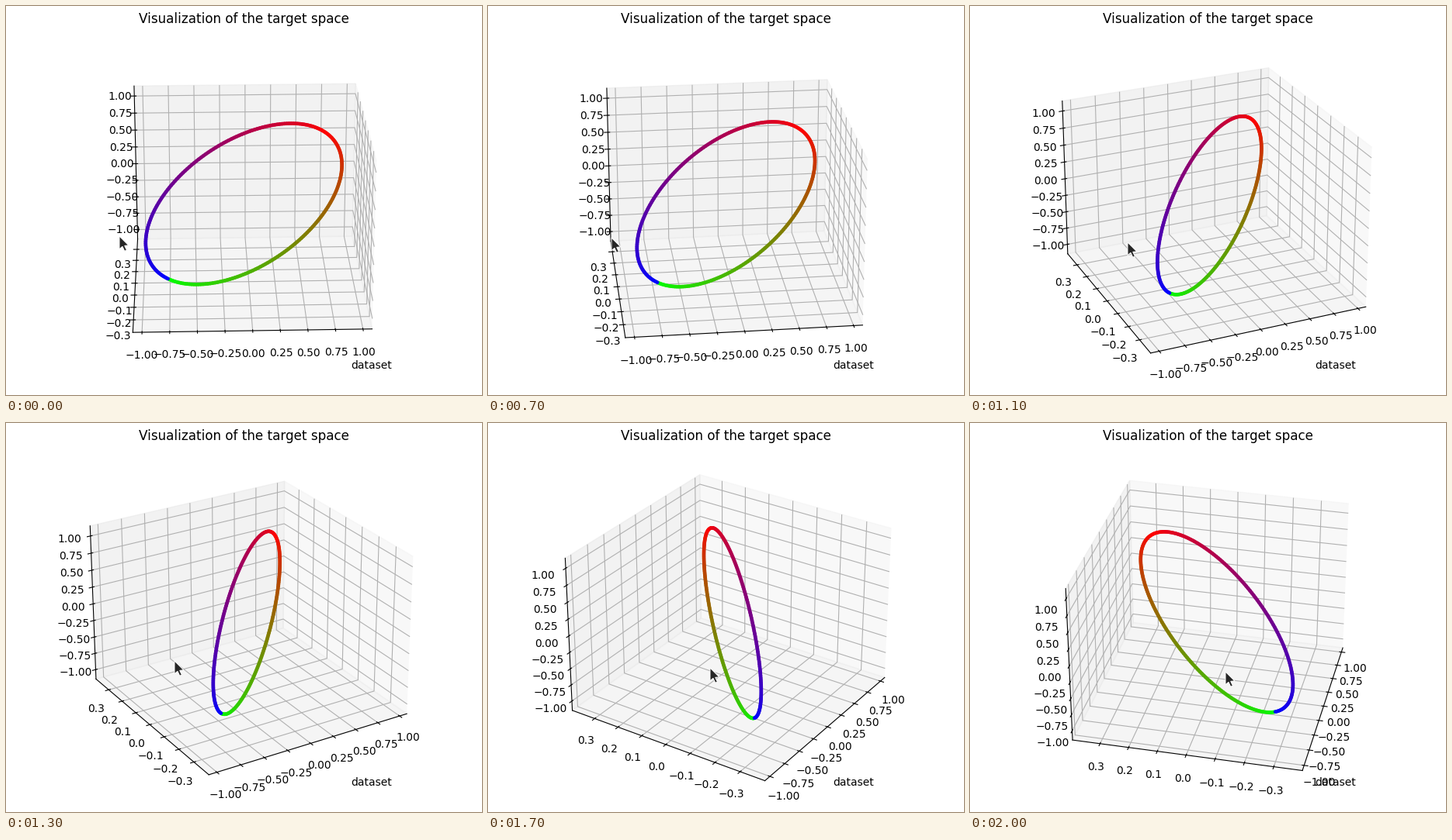
A matplotlib script for the animation above (2100 ms loop, 613 px wide and 502 px high).

```python
import numpy as np
import matplotlib.pyplot as plt
from matplotlib.animation import FuncAnimation
from matplotlib.patches import Polygon
from mpl_toolkits.mplot3d.art3d import Line3DCollection

W, H, DPI = 613, 502, 100
FRAMES, INTERVAL = 21, 100
REACH = np.array([1.083, 0.397, 1.146])    # half extent of each axis

# key points of the drag: step, azimuth, pointer x
STEPS = [0, 1, 4, 6, 8, 11, 14]
AZIM = [-91.9, -94.4, -101.4, -113.8, -121.6, -146.5, -167]
MOUSE = [146, 154, 170, 203, 217, 286, 329]

ARROW = 1.12 * np.array([(0, 0), (0, 15), (3.5, 11.9), (6, 17.2),
                         (8.4, 16.1), (6, 11), (10.6, 10.6)])

plt.rcParams["font.family"] = "DejaVu Sans"

# the tiny surplus keeps the pixel size from being truncated
fig = plt.figure(figsize=((W + 1e-6) / DPI, (H + 1e-6) / DPI), dpi=DPI,
                 facecolor="white")
fig.suptitle("Visualization of the target space", x=306 / W, y=0.984,
             fontsize=12.1)
fig.text(444.3 / W, 34 / H, "dataset", fontsize=10)

side = 460.7
ax = fig.add_axes([76 / W, 11.2 / H, side / W, side / H], projection="3d")
lo, hi = -REACH, REACH
ax.set(xlim=(lo[0], hi[0]), ylim=(lo[1], hi[1]), zlim=(lo[2], hi[2]),
       xticks=np.linspace(-1, 1, 9), yticks=np.linspace(-0.3, 0.3, 7),
       zticks=np.linspace(-1, 1, 9))


def ring(n=240):
    """Upright ring on the box diagonal, green to red to blue from its seam."""
    t = np.radians(-143) + np.linspace(0, 2 * np.pi, n + 1)
    pts = np.column_stack([np.cos(t), np.cos(t), np.sin(t)]) * 0.88 * REACH
    s = (np.arange(n) + 0.5) / n
    rgb = np.column_stack([1 - np.abs(2 * s - 1),
                           np.clip(1 - 2 * s, 0, 1),
                           np.clip(2 * s - 1, 0, 1)])
    return Line3DCollection(np.stack([pts[:-1], pts[1:]], axis=1),
                            colors=rgb, linewidths=3.3, capstyle="round")


ax.add_collection3d(ring())

pointer = Polygon(ARROW, closed=True, facecolor="#262626", edgecolor="white",
                  linewidth=0.7, zorder=10, transform=fig.dpi_scale_trans)
fig.add_artist(pointer)


def step_at(i):
    """Rest at first, then one step per frame with a short pause."""
    return max(0, i - 5) - (i > 15)


def update(i):
    step = step_at(i)
    x = np.interp(step, STEPS, MOUSE)
    drop = ((x - MOUSE[0]) / (MOUSE[-1] - MOUSE[0])) ** 0.9
    ax.view_init(elev=21.9 + 9.1 * drop, azim=np.interp(step, STEPS, AZIM))
    tip = np.round([x, 297 + 24 * drop])
    px, py = (ARROW + tip).T
    pointer.set_xy(np.column_stack([px, H - py]) / DPI)
    return ax, pointer


anim = FuncAnimation(fig, update, frames=FRAMES, interval=INTERVAL,
                     init_func=lambda: update(0), blit=False, repeat=True,
                     cache_frame_data=False)

plt.show()
```
